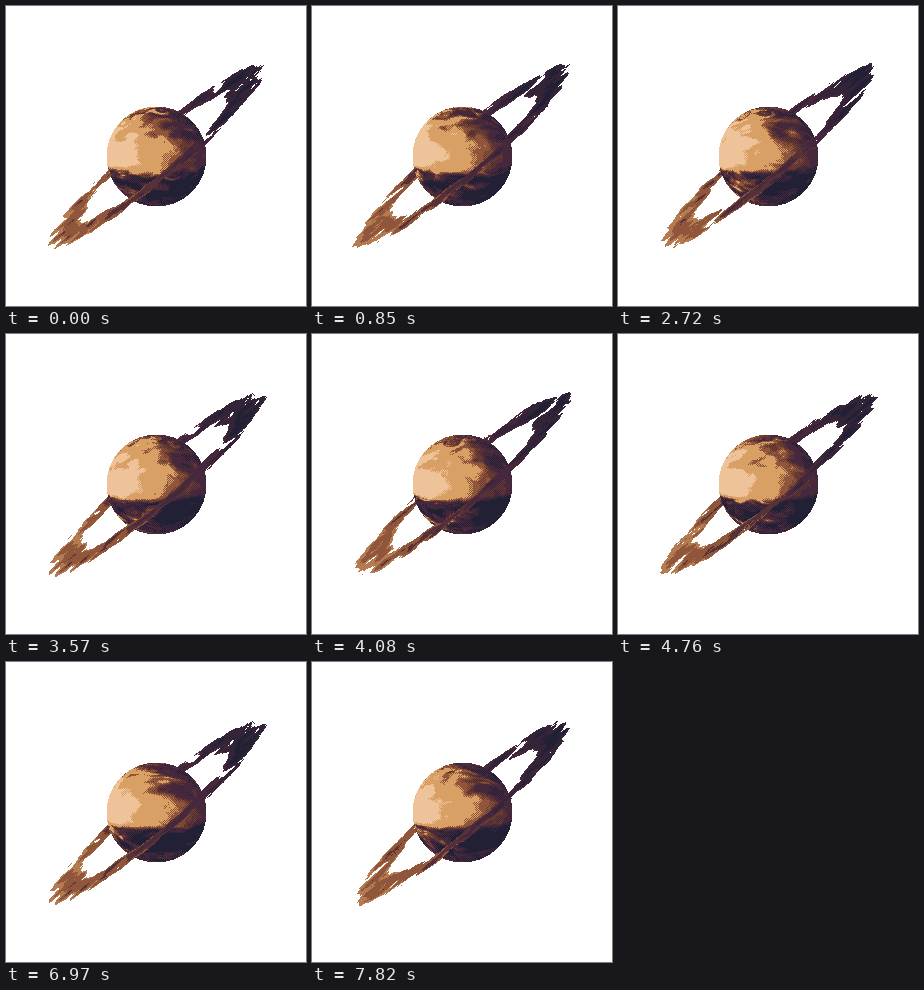
An HTML page with a canvas that plays this animation: 300 by 300 pixels, repeating every 7.99 s.

```html
<!DOCTYPE html>
<html lang="en">
<head>
<meta charset="utf-8">
<title>Ringed planet</title>
<style>
html, body { margin: 0; width: 100%; height: 100%; overflow: hidden; background: #fff; }
canvas { display: block; width: 100vw; height: 100vh; image-rendering: pixelated; }
</style>
</head>
<body>
<canvas id="stage" width="300" height="300"></canvas>
<script>
const SIZE = 300, STEP = 170, STEPS = 47;
const LOOP_STEPS = 100;               // steps in one full turn of the noise
const ctx = document.getElementById('stage').getContext('2d');
const image = ctx.createImageData(SIZE, SIZE);
const pixels = new Uint32Array(image.data.buffer);
const WHITE = 0xffffffff;

const LIGHT = [[238, 195, 154], [217, 160, 102], [143, 86, 59]];
const DARK = [[102, 57, 49], [69, 40, 60], [34, 32, 52]];

// Band strength by latitude, from north to south
const BANDS = [[0, .42], [.1, .42], [.2, .44], [.3, .39], [.38, .39], [.45, .26],
  [.52, .22], [.555, .25], [.61, .55], [.7, .59], [.82, .48], [1, .45]];

const clamp = v => Math.min(1, Math.max(0, v));
const fract = v => v - Math.floor(v);
const mod = (v, n) => v - n * Math.floor(v / n);
const smooth = (a, b, v) => {
  const t = clamp((v - a) / (b - a));
  return t * t * (3 - 2 * t);
};

function shade(ramp, v) {
  const p = clamp(v) * 2, i = Math.min(1, Math.floor(p)), k = p - i;
  const [r, g, b] = ramp[i].map((c, n) => Math.round(c + (ramp[i + 1][n] - c) * k));
  return (255 << 24 | b << 16 | g << 8 | r) >>> 0;
}

function makeNoise(size, seed, octaves) {
  const rand = (x, y) => fract(Math.sin(
    mod(x, 2 * size) * 12.9898 + mod(y, size) * 78.233) * 15.5453 * seed);
  function noise(x, y) {
    const ix = Math.floor(x), iy = Math.floor(y);
    const fx = x - ix, fy = y - iy;
    const u = fx * fx * (3 - 2 * fx), v = fy * fy * (3 - 2 * fy);
    const a = rand(ix, iy), b = rand(ix + 1, iy);
    const c = rand(ix, iy + 1), d = rand(ix + 1, iy + 1);
    return (a + (b - a) * u) * (1 - v) + (c + (d - c) * u) * v;
  }
  function fbm(x, y) {
    let sum = 0, amp = .5;
    for (let i = 0; i < octaves; i++, amp /= 2, x *= 2, y *= 2) sum += noise(x, y) * amp;
    return sum;
  }
  return { rand, fbm };
}

const gas = makeNoise(10, 6.314, 3);
const dust = makeNoise(15, 8.461, 6);

function bandAt(y) {
  let i = 1;
  while (i < BANDS.length - 1 && BANDS[i][0] < y) i++;
  const [y0, a] = BANDS[i - 1], [y1, b] = BANDS[i];
  return a + (b - a) * smooth(y0, y1, y);
}

// Round cells that twist the gas into storms
function storm(x, y) {
  const row = Math.floor(y);
  x += row * .31;
  const h = gas.rand(Math.floor(x), row);
  const off = .25 + h * .5;
  const d = Math.hypot(fract(x) - off, y - row - off);
  return smooth(0, h * .25, d * .75);
}

function buildPlanet() {
  const points = [];
  for (let py = 0; py < 100; py++) for (let px = 0; px < 100; px++) {
    const u = px / 100, v = py / 100;
    if (Math.hypot(u - .5, v - .5) > .49999) continue;
    const cx = u * 2 - 1, cy = v * 2 - 1;
    const z = 1 + Math.sqrt(Math.max(0, 1 - cx * cx - cy * cy));
    const sx = cx / z / 2 + .5, sy = cy / z / 2 + .5;
    points.push({
      at: (py + 100) * SIZE + px + 100,
      x: sx * 10.107, y: sy * 10.107,
      base: gas.fbm(sx * 10.107, sy * 10.107),
      band: bandAt(sy) ** 2 * 7,
      far: Math.hypot(u + .1, v - .3),
      dither: (px + py) % 2 === 0
    });
  }
  return points;
}

function buildRing() {
  const points = [], c = Math.cos(.7), s = Math.sin(.7), width = .127;
  for (let py = 0; py < SIZE; py++) for (let px = 0; px < SIZE; px++) {
    const u = px / SIZE, v = py / SIZE;
    const x = c * (u - .5) - s * (v - .5);
    const side = s * (u - .5) + c * (v - .5);
    if (side < 0 && Math.hypot(x, side) < 1 / 6) continue;   // behind the planet
    const y = side * 6, d = Math.hypot(x, y);
    const ring = smooth(.5 - width * 2, .5 - width, d) * smooth(d - width, d, .4);
    if (ring < .28) continue;
    const glow = Math.hypot(u + .3, v - .7) ** 1.2 * 1.25;
    points.push({ at: py * SIZE + px, x, y, ring, glow });
  }
  return points;
}

const planet = buildPlanet(), ring = buildRing();

function drawPlanet(shift) {
  for (const p of planet) {
    let turn = 0;
    for (let i = 0; i < 10; i++) turn += storm(p.x * .3 + i + 11 + shift, p.y * .3 + i + 11);
    const warp = p.base + turn;
    const f = gas.fbm(p.x + warp - shift, p.y * 2 + warp) * p.band;
    let tone = smooth(-.2, 4.3 - f - p.far, f + p.far * 1.8);
    if (p.dither) tone *= 1.1;
    const level = Math.floor(tone * 4) / 2;
    pixels[p.at] = tone < .625 ? shade(LIGHT, level) : shade(DARK, level - 1);
  }
}

function drawRing(angle) {
  const c = Math.cos(angle), s = Math.sin(angle);
  for (const p of ring) {
    const x = c * p.x - s * p.y + .5, y = s * p.x + c * p.y + .5;
    const density = p.ring * dust.fbm(x * 15, y * 15);
    if (density < .28) continue;
    const level = Math.floor((density + p.glow) * 4) / 4;
    pixels[p.at] = level <= 1 ? shade(LIGHT, level) : shade(DARK, level - 1);
  }
}

let shown = -1;
function frame(now) {
  const step = Math.floor(now / STEP) % STEPS;
  if (step !== shown) {
    shown = step;
    const t = step / LOOP_STEPS;
    pixels.fill(WHITE);
    drawPlanet(t * 20);
    drawRing(t * Math.PI * 10);
    ctx.putImageData(image, 0, 0);
  }
  requestAnimationFrame(frame);
}
frame(performance.now());
</script>
</body>
</html>
```
